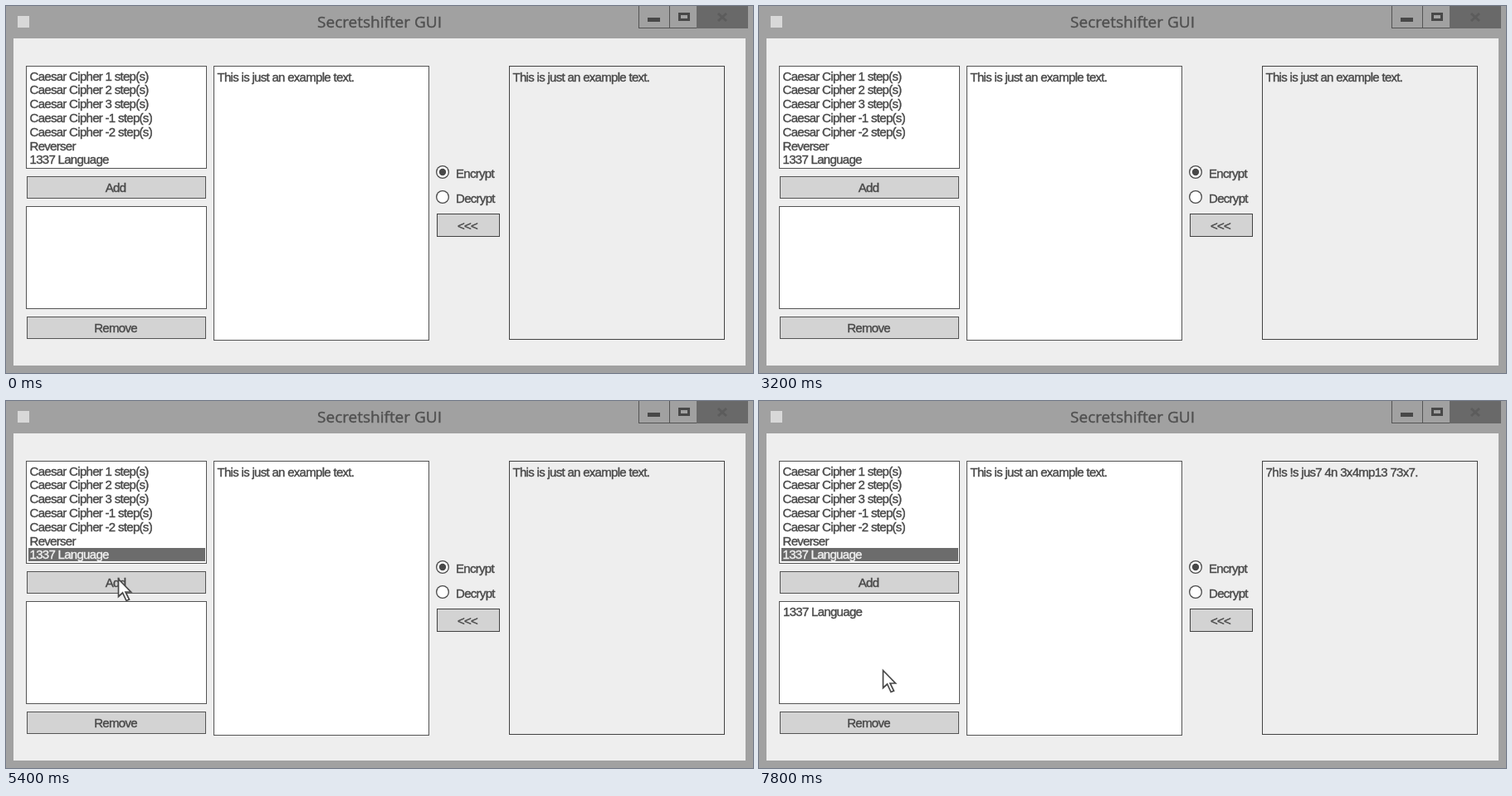
Animation, 900 px wide and 442 px high, one loop 8 s. Source, as an HTML page with a canvas:

```html
<!DOCTYPE html>
<html lang="en">
<head>
<meta charset="utf-8">
<title>Secretshifter GUI</title>
<style>
  html, body { margin: 0; width: 100%; height: 100%; overflow: hidden; background: #a1a1a1; }
  canvas { display: block; }
</style>
</head>
<body>
<canvas id="stage" width="900" height="442"></canvas>
<script>
const ctx = document.getElementById('stage').getContext('2d');
const LOOP = 8000, STEP = 200;
const SELECT_AT = 4600, ADD_AT = 6800;
const INK = '#484848', LINE = '#545454', DARK_LINE = '#424242';
const FRAME = '#a1a1a1', FACE = '#eeeeee', BUTTON = '#d3d3d3';

const ciphers = [
  ...[1, 2, 3, -1, -2].map(n => `Caesar Cipher ${n} step(s)`),
  'Reverser', '1337 Language'
];

// Pointer stops: time, x, y
const pointerPath = [
  [3600, 100, 122], [4000, 96, 150], [4400, 93, 179], [4800, 93, 181],
  [5400, 135, 213], [5800, 135, 219], [6800, 135, 219],
  [7400, 148, 302], [7800, 149, 323]
];
const arrow = new Path2D('M0 0V21L5 16.5L9.5 26L13 24.5L8.5 15.5H15Z');

function fill(x, y, w, h, color) {
  ctx.fillStyle = color;
  ctx.fillRect(x, y, w, h);
}

function box(x, y, w, h, color, line = LINE) {
  fill(x, y, w, h, color);
  ctx.lineWidth = 1;
  ctx.strokeStyle = line;
  ctx.strokeRect(x + 0.5, y + 0.5, w - 1, h - 1);
}

// A hairline outline gives the lettering its heavier weight.
function heavyText(str, x, y, color, align) {
  ctx.textAlign = align;
  ctx.fillStyle = ctx.strokeStyle = color;
  ctx.lineWidth = 0.4;
  ctx.fillText(str, x, y);
  ctx.strokeText(str, x, y);
}

function text(str, x, y, color = INK, align = 'left') {
  ctx.font = '15px "Liberation Sans", Arial, sans-serif';
  ctx.letterSpacing = '-0.7px';
  heavyText(str, x, y, color, align);
}

function button(label, x, y, w, h, line) {
  box(x, y, w, h, BUTTON, line);
  text(label, x + w / 2 - 1, y + h / 2 + 5.5, INK, 'center');
}

function disc(x, y, r, color) {
  ctx.beginPath();
  ctx.arc(x, y, r, 0, 2 * Math.PI);
  ctx.fillStyle = color;
  ctx.fill();
}

function radio(label, y, checked) {
  disc(526, y, 8, '#484848');
  disc(526, y, 6.7, '#ffffff');
  if (checked) disc(526, y, 4.2, '#484848');
  text(label, 542, y + 6.5);
}

function drawTitleBar() {
  fill(14, 12, 14, 14, '#d8d8d8');
  ctx.font = '19px "Open Sans", sans-serif';
  ctx.letterSpacing = '0px';
  heavyText('Secretshifter GUI', 450, 26, '#505050', 'center');

  box(762, -1, 38, 28, FRAME);
  box(799, -1, 34, 28, FRAME);
  fill(832, 0, 62, 27, '#696969');
  fill(773, 14, 15, 5, '#484848');
  ctx.strokeStyle = '#484848';
  ctx.lineWidth = 3;
  ctx.strokeRect(811.5, 9.5, 11, 7);
  ctx.strokeStyle = '#5c5c5c';
  ctx.beginPath();
  ctx.moveTo(858, 9);
  ctx.lineTo(868, 18);
  ctx.moveTo(868, 9);
  ctx.lineTo(858, 18);
  ctx.stroke();
}

function drawLists(selected, added) {
  box(24, 72, 218, 124, '#ffffff');
  ciphers.forEach((name, i) => {
    const active = selected && i === ciphers.length - 1;
    if (active) fill(27, 177, 213, 16, '#6c6c6c');
    text(name, 28.5, 89.5 + i * 16.8, active ? '#f2f2f2' : INK);
  });
  button('Add', 25, 205, 216, 27);
  box(24, 241, 218, 124, '#ffffff');
  if (added) text('1337 Language', 29, 258.5);
  button('Remove', 25, 374, 216, 27);
}

function pointerAt(t) {
  const next = pointerPath.findIndex(stop => stop[0] > t);
  if (next === 0) return null;
  if (next < 0) return pointerPath.at(-1).slice(1);
  const [t0, x0, y0] = pointerPath[next - 1], [t1, x1, y1] = pointerPath[next];
  const k = (t - t0) / (t1 - t0);
  return [x0 + (x1 - x0) * k, y0 + (y1 - y0) * k];
}

function drawPointer([x, y]) {
  ctx.save();
  ctx.translate(Math.round(x) + 0.5, Math.round(y) + 1.5);
  ctx.fillStyle = '#ffffff';
  ctx.strokeStyle = '#484848';
  ctx.lineWidth = 1.7;
  ctx.fill(arrow);
  ctx.stroke(arrow);
  ctx.restore();
}

function draw(t) {
  const added = t >= ADD_AT;
  fill(0, 0, 900, 442, FRAME);
  fill(9, 39, 882, 394, FACE);
  drawTitleBar();
  drawLists(t >= SELECT_AT, added);

  const plain = 'This is just an example text.';
  box(250, 72, 260, 331, '#ffffff');
  text(plain, 254.5, 91);
  radio('Encrypt', 200, true);
  radio('Decrypt', 230, false);
  button('<<<', 519, 250, 76, 28, DARK_LINE);
  box(606, 72, 260, 330, FACE, DARK_LINE);
  text(added ? '7h!s !s jus7 4n 3x4mp13 73x7.' : plain, 610.5, 91);

  const pointer = pointerAt(t);
  if (pointer) drawPointer(pointer);
}

function tick() {
  const t = performance.now() % LOOP;
  draw(Math.floor(t / STEP) * STEP);
  requestAnimationFrame(tick);
}
tick();
</script>
</body>
</html>
```
